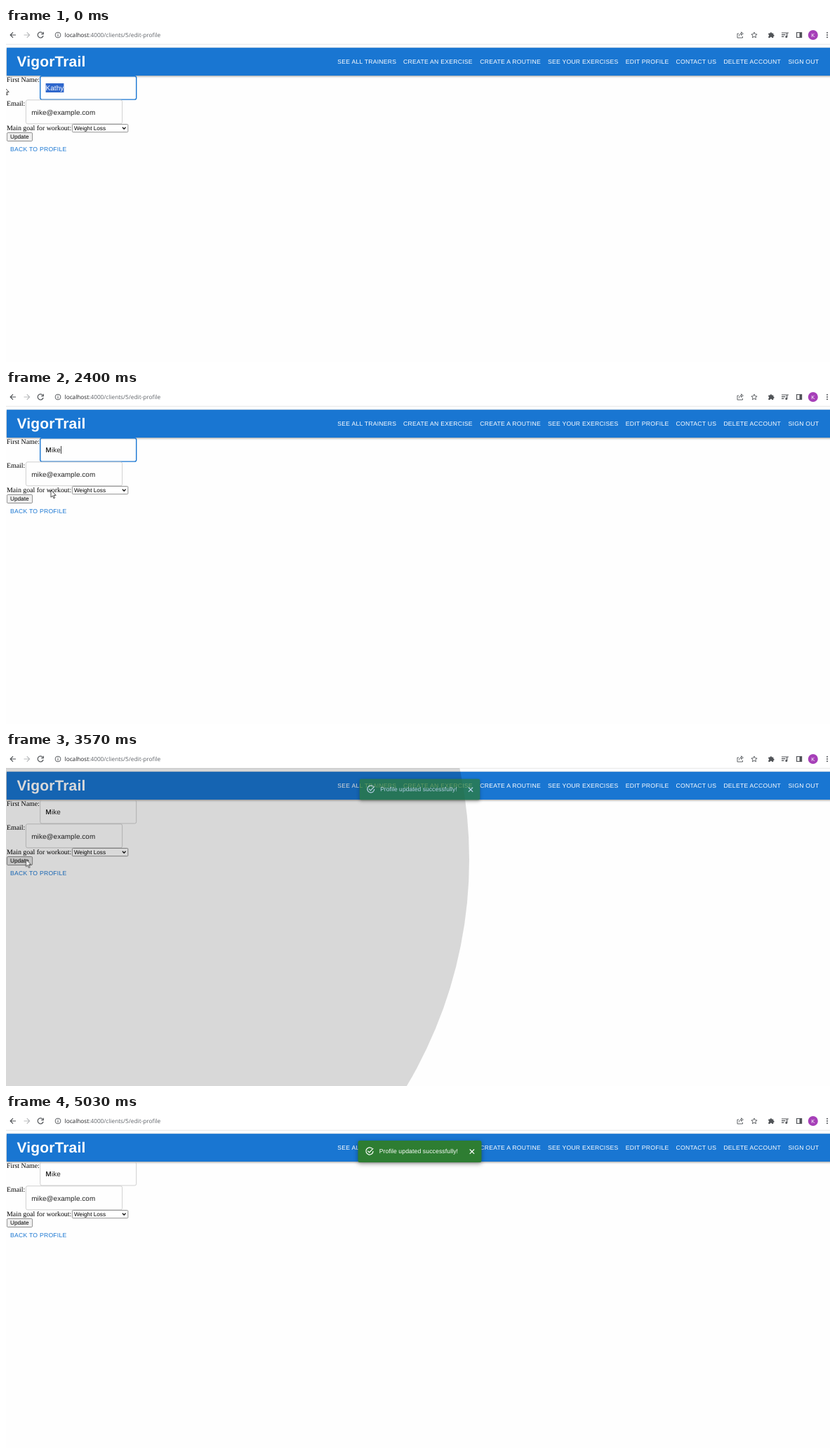
These frames come from a looping animation (1174x477 px, 6240 ms). An HTML page:

```html
<!DOCTYPE html>
<html lang="en">
<head>
<meta charset="utf-8">
<title>Edit profile</title>
<style>
html, body { margin: 0; width: 100%; height: 100%; overflow: hidden; background: #fefefe; }
svg { display: block; width: 1174px; height: 477px; }
text {
  font-family: "Liberation Sans", Arial, sans-serif;
  text-rendering: geometricPrecision;
  white-space: pre;
}
.url { font: 8.28px "Open Sans", sans-serif; fill: #5f6368; }
.icon { fill: none; stroke: #505357; stroke-width: 1.2; }
.solid { fill: #505357; }
.bar { fill: #1976d2; filter: drop-shadow(0 1.5px 1.8px rgba(0, 0, 0, .4)); }
.brand { font-size: 21px; font-weight: 700; letter-spacing: .00735em; fill: #fff; }
.btn { font-size: 8.63px; letter-spacing: .02857em; }
.menu { fill: #fff; }
.link { fill: #1976d2; }
.label { font: 9.87px "Liberation Serif", Times, serif; }
.value { font-size: 9.87px; letter-spacing: .00938em; fill: #212121; }
.control { font-size: 8.23px; }
.field { fill: none; stroke: #c4c4c4; stroke-width: .8; }
.toast rect { fill: #2e7d32; filter: drop-shadow(0 2px 3px rgba(0, 0, 0, .4)); }
.toast text { font-size: 8.66px; letter-spacing: .01071em; fill: #fff; }
.toast path { fill: none; stroke: #fff; stroke-width: 1.2; }

.step { animation: 6240ms step-end infinite; }
.old { animation-name: old; }
.first { animation-name: first; }
.rest { animation-name: rest; }
.caret { animation-name: caret; }
.focus { animation-name: focus; }
.hover { animation-name: hover; }
.update { animation-name: update; }
.ripple { animation-name: ripple; }
.toast { animation-name: toast; transform-origin: 589.5px 53.5px; }
.cursor { animation-name: cursor; }

@keyframes old { 0% { opacity: 1 } 16.98%, 100% { opacity: 0 } }
@keyframes first { 0% { opacity: 0 } 16.98%, 100% { opacity: 1 } }
@keyframes rest { 0% { opacity: 0 } 19.39%, 100% { opacity: 1 } }
@keyframes caret {
  0% { opacity: 0; transform: none }
  16.98% { opacity: 1; transform: none }
  19.39% { opacity: 1; transform: translateX(13px) }
  29.16% { opacity: 0; transform: translateX(13px) }
  36.05% { opacity: 1; transform: translateX(13px) }
  45.67% { opacity: 0; transform: translateX(13px) }
  52.72% { opacity: 1; transform: translateX(13px) }
  54.96%, 100% { opacity: 0; transform: none }
}
@keyframes focus {
  0% { stroke: #1976d2; stroke-width: 1.4px }
  54.96%, 100% { stroke: #c4c4c4; stroke-width: .8px }
}
@keyframes hover {
  0%, 38.46%, 100% { stroke: #c4c4c4 }
  36.05% { stroke: #212121 }
}
@keyframes update {
  0%, 68.9%, 100% { fill: #efefef }
  40.86% { fill: #e5e5e5 }
}
@keyframes ripple {
  0%, 61.69%, 100% { r: 0px; fill-opacity: 0 }
  54.96% { r: 24px; fill-opacity: .12 }
  57.21% { r: 632px; fill-opacity: .15 }
  59.29% { r: 1220px; fill-opacity: .05 }
}
@keyframes toast {
  0% { opacity: 0; transform: scale(.975) }
  57.21% { opacity: .7; transform: scale(.975) }
  59.29%, 100% { opacity: 1; transform: none }
}
@keyframes cursor {
  0% { transform: translate(-3px, 84px) }
  33.97% { transform: translate(16px, 97px) }
  36.05% { transform: translate(48px, 122px) }
  38.46% { transform: translate(64px, 143px) }
  40.86% { transform: translate(35px, 153.5px) }
  43.26% { transform: translate(28.5px, 153.5px) }
  66.5% { transform: translate(49px, 158.5px) }
  68.9% { transform: translate(363.5px, 183px) }
  71.31% { transform: translate(390px, 191px) }
  73.39% { transform: translate(405.5px, 197px) }
  75.8% { transform: translate(965.5px, 388px) }
  78.2% { transform: translate(1172px, 471px) }
  80.6%, 100% { transform: translate(1200px, 490px) }
}
</style>
</head>
<body>
<svg viewBox="0 0 1174 477">
  <clipPath id="page"><path d="M0 23H1148V477H0Z"/></clipPath>

  <!-- browser toolbar -->
  <rect width="1174" height="23" fill="#fff"/>
  <rect y="22.8" width="1174" height=".8" fill="#e2e2e2"/>
  <g class="icon">
    <path d="M14 10H6.3M10 6.2 6.2 10 10 13.8"/>
    <path d="M25.5 10H33.5M29.8 6.2 33.6 10 29.8 13.8" stroke="#b9bbbd"/>
    <path d="M52.3 7.4A4 4 0 1 0 53.1 11M53.3 5.8V8.7H50.3"/>
    <circle cx="74" cy="10" r="3.9" stroke-width=".9"/>
    <path d="M74 9.3V12.3M74 7.5V8.5" stroke-width="1"/>
    <path d="M1044 8H1042V14H1049.5V12M1044.5 11.5C1044.7 9 1046 8 1048 8M1047.6 5.8 1050.3 8.1 1047.6 10.4Z" stroke-width=".9"/>
    <path d="M1066 6 1067.2 8.7 1070.1 9 1067.9 10.9 1068.6 13.8 1066 12.3 1063.4 13.8 1064.1 10.9 1061.9 9 1064.8 8.7Z" stroke-width=".9"/>
    <path d="M1105 7H1112M1105 9.7H1110.5M1105 12.4H1108.5M1112.7 12.5V7H1115"/>
    <path d="M1126.6 6.5H1133.6V13.5H1126.6Z"/>
  </g>
  <g class="solid">
    <path d="M1086.3 7.5H1088.6A1.3 1.3 0 0 1 1091.2 7.5H1093.3V9.5A1.3 1.3 0 0 1 1093.3 12.1V14H1091.2A1.3 1.3 0 0 0 1088.6 14H1086.3V12A1.3 1.3 0 0 0 1086.3 9.5Z"/>
    <circle cx="1111.8" cy="12.6" r="1.5"/>
    <path d="M1130.5 6.5H1133.6V13.5H1130.5Z"/>
    <circle cx="1170" cy="6.8" r="1"/><circle cx="1170" cy="10" r="1"/><circle cx="1170" cy="13.2" r="1"/>
  </g>
  <circle cx="1149.8" cy="10" r="7" fill="#a63fb8"/>
  <text x="1149.8" y="12.7" font-size="7.5" text-anchor="middle" fill="#fff">K</text>
  <text class="url" x="83.6" y="13"><tspan fill="#202124">localhost</tspan>:4000/clients/5/edit-profile</text>

  <!-- app bar -->
  <rect class="bar" x="1" y="28.2" width="1180" height="39.8"/>
  <text class="brand" x="15.4" y="55">VigorTrail</text>
  <g class="btn menu">
    <text x="472.3" y="51.1">SEE ALL TRAINERS</text>
    <text x="566.1" y="51.1">CREATE AN EXERCISE</text>
    <text x="675.2" y="51.1">CREATE A ROUTINE</text>
    <text x="771.9" y="51.1">SEE YOUR EXERCISES</text>
    <text x="882.7" y="51.1">EDIT PROFILE</text>
    <text x="954.6" y="51.1">CONTACT US</text>
    <text x="1022.4" y="51.1">DELETE ACCOUNT</text>
    <text x="1114.6" y="51.1">SIGN OUT</text>
  </g>

  <!-- form -->
  <text class="label" x="1" y="77">First Name:</text>
  <text class="label" x="1" y="111.3">Email:</text>
  <text class="label" x="1" y="146">Main goal for workout:</text>
  <rect class="field step focus" x="48.7" y="68.7" width="137" height="33.4" rx="2.4"/>
  <rect class="field step hover" x="28.4" y="102.8" width="137.2" height="34" rx="2.4"/>
  <g class="step old">
    <rect x="56.6" y="79" width="25.8" height="13" fill="#2f67cc"/>
    <text class="value" x="56.6" y="89.2" style="fill:#fff">Kathy</text>
  </g>
  <text class="value" x="56.6" y="89.2"><tspan class="step first">M</tspan></text>
  <text class="value step first" x="56.6" y="89.2">M</text>
  <text class="value step rest" x="64.9" y="89.2">ike</text>
  <rect class="step caret" x="65.2" y="80" width=".8" height="11" fill="#111"/>
  <text class="value" x="36.3" y="123.6">mike@example.com</text>

  <rect x="94.4" y="137.5" width="79.4" height="11.2" rx="1.2" fill="#fff" stroke="#767676" stroke-width=".8"/>
  <text class="control" x="97" y="146">Weight Loss</text>
  <path d="M165.9 141.8 168.2 144.2 170.5 141.8" fill="none" stroke="#111" stroke-width="1.3"/>
  <rect class="step update" x="1.4" y="149.5" width="36.2" height="12" rx="1.4" stroke="#767676" stroke-width=".8"/>
  <text class="control" x="6" y="158.4">Update</text>
  <text class="btn link" x="6" y="176.3">BACK TO PROFILE</text>

  <g clip-path="url(#page)"><circle class="step ripple" cx="28" cy="153.5" r="0"/></g>

  <g class="step toast">
    <rect x="501.5" y="38" width="176" height="31" rx="2.5"/>
    <path d="M521.6 49.3A5.1 5.1 0 1 0 523.1 53M515.3 52.6 517.6 55 523.2 49.2"/>
    <text x="531.7" y="56.3">Profile updated successfully!</text>
    <path d="M660.7 50.5 667.1 56.9M667.1 50.5 660.7 56.9"/>
  </g>

  <path class="step cursor" d="M0 0V10.2L2.4 8 4 11.8 5.6 11.1 4 7.4H7.2Z" fill="#fff" stroke="#222" stroke-width=".8"/>
</svg>
</body>
</html>
```
